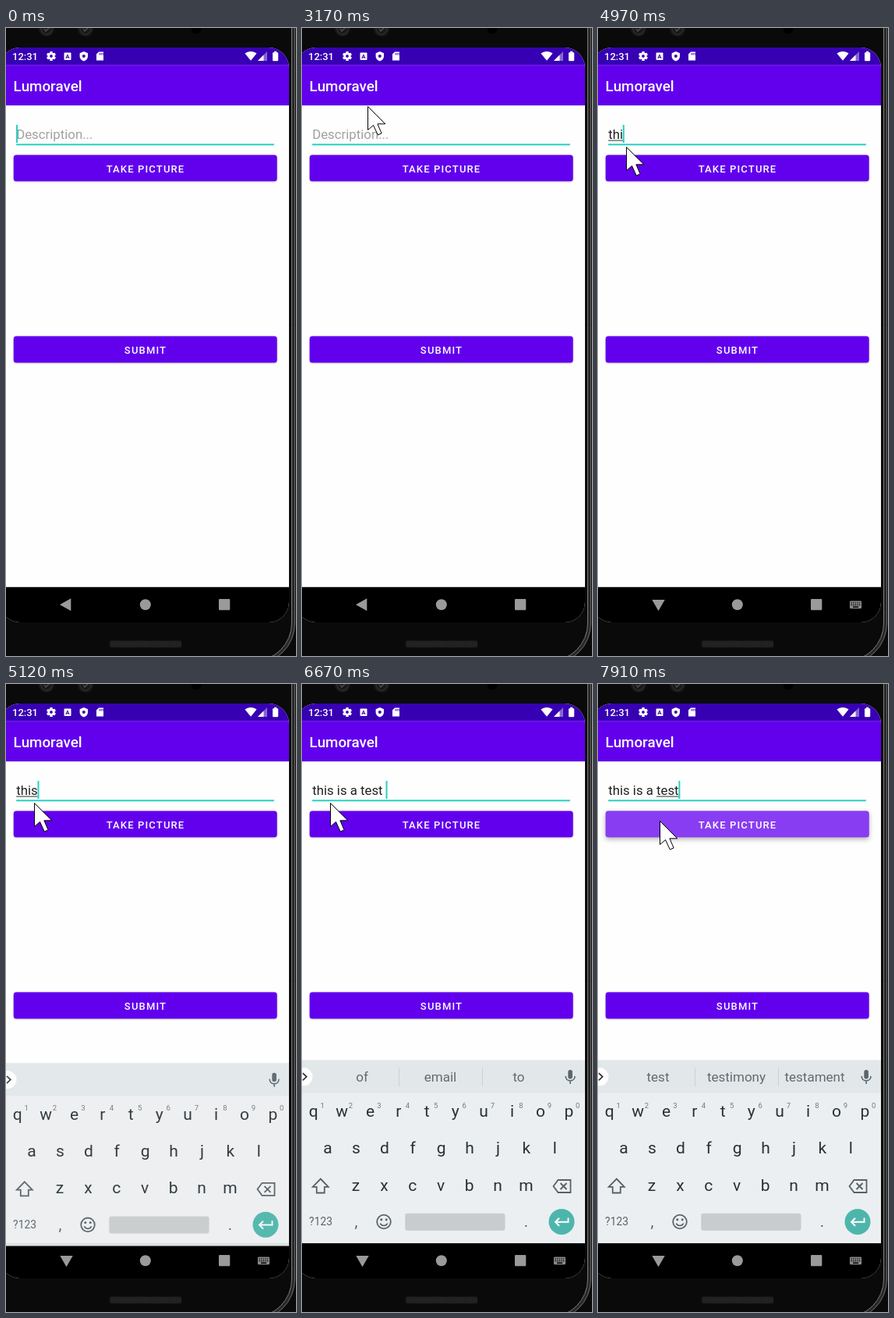
These frames come from a looping animation (372 by 804 pixels, 8 s). An HTML page with a canvas:

```html
<!DOCTYPE html>
<html lang="en">
<head>
<meta charset="utf-8">
<title>Post a picture</title>
<style>
html, body { margin: 0; width: 100%; height: 100%; overflow: hidden; background: #0a0a0a; }
canvas { display: block; width: 372px; height: 804px; }
</style>
</head>
<body>
<canvas id="stage" width="372" height="804"></canvas>
<script>
const ctx = document.getElementById('stage').getContext('2d');
const LOOP = 8000;
const PURPLE = '#6200ee', TEAL = '#2bcfc2';
const TEXT_SIZE = 16.8, TEXT_X = 13.2;

// Pointer tip: time, x, y
const pointerSteps = [
  [140, 285, 767], [220, 268, 640], [300, 240, 480], [380, 212, 330],
  [460, 184, 215], [530, 165, 140], [610, 152, 97], [680, 147, 112],
  [980, 147, 128], [1060, 138, 150], [1150, 131, 159],
  [1380, 127, 153], [1460, 125, 148], [1530, 124, 146],
  [3010, 112, 128], [3090, 96, 110], [3170, 84, 100],
  [3400, 78, 127], [3480, 84, 110], [3630, 87, 109], [3710, 89, 109],
  [3860, 86, 109], [3950, 80, 109], [4100, 76, 127], [4180, 36, 152],
  [7370, 48, 160], [7450, 66, 170], [7530, 79, 175]
];

// Time, typed text, suggestions
const typingSteps = [
  [4880, 't', ''], [4970, 'thi', ''], [5120, 'this', ''],
  [5270, 'this', 'this thistle things'],
  [5660, 'this ', 'is a one'],
  [5810, 'this i', 'I is in'], [5890, 'this is', "is isn't it"], [5970, 'this is ', 'a not the'],
  [6120, 'this is a', 'a and again'], [6350, 'this is a ', 'few good great'],
  [6430, 'this is a t', 'the to that'], [6510, 'this is a te', 'tell team text'],
  [6590, 'this is a test', 'test testimony testament'],
  [6670, 'this is a test ', 'of email to'],
  [6900, 'this is a test', 'test testimony testament']
];

// The caret flips at each of these times, starting visible
const caretFlips = [220, 680, 1150, 1700, 2230, 2710, 3090, 3630, 7450, 7910];

const latest = (steps, t) => steps.filter(s => s[0] <= t).pop();

function box(x, y, w, h, color, r = 0) {
  ctx.fillStyle = color;
  ctx.beginPath();
  ctx.roundRect(x, y, w, h, r);
  ctx.fill();
}

function disc(x, y, r, color) {
  ctx.fillStyle = color;
  ctx.beginPath();
  ctx.arc(x, y, r, 0, Math.PI * 2);
  ctx.fill();
}

function ring(x, y, r, color, width) {
  ctx.strokeStyle = color;
  ctx.lineWidth = width;
  ctx.beginPath();
  ctx.arc(x, y, r, 0, Math.PI * 2);
  ctx.stroke();
}

function shape(path, color, x = 0, y = 0) {
  ctx.save();
  ctx.translate(x, y);
  ctx.fillStyle = color;
  ctx.fill(new Path2D(path));
  ctx.restore();
}

function line(path, color, width, x = 0, y = 0) {
  ctx.save();
  ctx.translate(x, y);
  ctx.strokeStyle = color;
  ctx.lineWidth = width;
  ctx.stroke(new Path2D(path));
  ctx.restore();
}

function text(str, x, y, size, color, { weight = 400, align = 'left', spacing = 0 } = {}) {
  ctx.font = `${weight} ${size}px Roboto, sans-serif`;
  ctx.letterSpacing = spacing + 'px';
  ctx.textAlign = align;
  ctx.fillStyle = color;
  ctx.fillText(str, x, y);
}

function widthOf(str) {
  ctx.font = `400 ${TEXT_SIZE}px Roboto, sans-serif`;
  ctx.letterSpacing = '0px';
  return ctx.measureText(str).width;
}

function outline(inset, color, width) {
  ctx.strokeStyle = color;
  ctx.lineWidth = width;
  ctx.beginPath();
  ctx.roundRect(-60, -80, 432 - inset, 896 - inset, 54 - inset);
  ctx.stroke();
}

function phone() {
  box(0, 0, 372, 804, '#0a0a0a');
  outline(3.5, '#282828', 4);
  outline(5.5, '#7c7c7c', 1);
  outline(1.5, '#6c6c6c', 1);
  for (const x of [52, 102]) {
    disc(x, 1, 10, '#191919');
    ring(x, 1, 7, '#2b2b2b', 1.5);
    line('M-3 0L-1 3L4 -2', '#555', 1.2, x, 1);
  }
  disc(244, 1, 6.5, '#000');
  box(132, 784, 94, 9.5, '#171717', 4);
  for (let x = 135; x < 224; x += 2) box(x, 785, 1, 7.5, '#2d2d2d');
}

function statusBar() {
  box(-10, 25, 373, 22.5, '#3700b3');
  text('12:31', 8, 41, 13, '#fff', { weight: 500 });

  ctx.save();
  ctx.translate(58, 36);
  for (let i = 0; i < 6; i++) {
    ctx.rotate(Math.PI / 3);
    box(-1.7, -6, 3.4, 4, '#fff', 0.6);
  }
  ctx.restore();
  ring(58, 36, 3.2, '#fff', 2.6);

  box(74.5, 31.5, 9, 9.5, '#fff', 1);
  text('A', 79, 39.3, 8, '#3700b3', { weight: 700, align: 'center' });
  shape('M0 -6.2L5.2 -4V0C5.2 3 3 5.4 0 6.3C-3 5.4 -5.2 3 -5.2 0V-4Z', '#fff', 99.8, 36.2);
  disc(99.8, 36, 2, '#3700b3');
  shape('M-1.5 -5.5H4.5V5.5H-4.5V-2.5Z', '#fff', 120.5, 36);
  for (let i = 0; i < 3; i++) box(119.5 + i * 2, 32, 1, 2.4, '#3700b3');

  shape('M0 6L-7.5 -3.2C-3.5 -6.6 3.5 -6.6 7.5 -3.2Z', '#fff', 314, 35.8);
  shape('M12 0V12H0Z', 'rgba(255,255,255,.4)', 323, 30);
  shape('M7.5 4.5V12H0Z', '#fff', 323, 30);
  box(342, 31.2, 7.2, 11, '#fff', 1);
  box(344, 29.8, 3.2, 2, '#fff');
}

function button(y, h, raised) {
  ctx.save();
  ctx.shadowColor = raised ? 'rgba(0,0,0,.3)' : 'rgba(0,0,0,.2)';
  ctx.shadowBlur = raised ? 6 : 2;
  ctx.shadowOffsetY = raised ? 2.5 : 1;
  box(9.7, y, 338, h, PURPLE, 3.5);
  ctx.restore();
}

function label(str, y) {
  text(str, 179, y, 13, '#fff', { weight: 500, align: 'center', spacing: 1.16 });
}

function ripple(p) {
  ctx.save();
  ctx.beginPath();
  ctx.roundRect(9.7, 162.5, 338, 33.7, 3.5);
  ctx.clip();
  disc(79 + 60 * p, 178, 60 + 220 * p, `rgba(255,255,255,${0.12 + 0.12 * p})`);
  ctx.restore();
}

function field(t, typed) {
  box(TEXT_X, 148.3, 330.6, 1.9, TEAL);
  text(typed || 'Description...', TEXT_X, 142, TEXT_SIZE, typed ? '#212121' : '#a0a0a0');
  const word = typed.split(' ').pop();
  const end = TEXT_X + widthOf(typed);
  if (word) {
    const w = widthOf(word);
    box(end - w, 143.6, w, 1, '#333');
  }
  const flips = caretFlips.filter(f => f <= t).length;
  if (flips % 2 === 0) box(end - 0.2, 124, 2, 23, TEAL);
}

function navBar(typing) {
  const grey = '#9a9a9a';
  box(-10, 715.8, 373, 46, '#000');
  disc(178.8, 738.3, 7, grey);
  box(273, 731, 14.3, 14.3, grey, 1);
  if (!typing) {
    shape('M69 738.3L83.3 730.3V746.3Z', grey);
    return;
  }
  shape('M69.3 732H85.7L77.5 746.3Z', grey);
  box(323, 733.5, 15, 9.8, '#8a8a8a', 1);
  for (let i = 0; i < 5; i++) {
    box(324.5 + i * 2.6, 735.2, 1.4, 1.4, '#000');
    box(324.5 + i * 2.6, 737.8, 1.4, 1.4, '#000');
  }
  box(327, 740.6, 7, 1.3, '#000');
}

function suggestionStrip(words) {
  box(-10, 481.5, 373, 42, '#e2e7ea');
  disc(2, 502.8, 11.5, '#fff');
  line('M1 498.2L5.8 502.8L1 507.4', '#333', 1.7);
  if (words) {
    words.split(' ').forEach((w, i) => text(w, 77 + i * 100.5, 509.3, 17, '#616b70', { align: 'center' }));
    for (const x of [124, 231]) box(x, 491, 1, 24, '#cbd1d4');
  }
  box(341.3, 494, 5.6, 11.5, '#5a666c', 2.8);
  line('M338.2 502C338.2 510 350 510 350 502M344.1 508V512', '#5a666c', 1.6);
}

function keyboard(words) {
  const ink = '#263238', grey = '#566268';
  box(-10, 523, 373, 192.8, '#eceff1');
  suggestionStrip(words);

  const rows = [['qwertyuiop', 14.7], ['asdfghjkl', 33], ['zxcvbnm', 69]];
  rows.forEach(([keys, x0], r) => {
    [...keys].forEach((k, i) => {
      const x = x0 + i * 36.4;
      text(k, x, 554.2 + r * 47.2, 21, ink, { align: 'center' });
      if (r === 0) text(String((i + 1) % 10), x + 11.4, 542.5, 9.5, '#6f797e', { align: 'center' });
    });
  });

  line('M0 -9.5L10 0.8H5V8.5H-5V0.8H-10Z', grey, 1.8, 23.8, 643);
  line('M-11 0L-5 -8H11V8H-5ZM-2 -4L6 4M6 -4L-2 4', grey, 1.8, 333.5, 643);

  text('?123', 24, 693.3, 13.8, grey, { align: 'center' });
  text(',', 69.5, 695, 20, grey, { align: 'center' });
  text('.', 287.5, 695, 20, grey, { align: 'center' });
  ring(105, 688.5, 8.8, grey, 1.8);
  disc(101.8, 685.8, 1.5, grey);
  disc(108.2, 685.8, 1.5, grey);
  line('M-4.6 2C-3 6 3 6 4.6 2', grey, 1.7, 105, 688.5);
  box(132.3, 677.8, 128.2, 22, '#c8ccce', 3);
  disc(333, 688.4, 16.5, '#4db6ac');
  line('M8.5 -4.5V0.8H-7.5M-3 -4.2L-8 0.8L-3 5.8', '#fff', 2, 333, 688);
}

function pointer(x, y) {
  const arrow = 'M0 0V30L7 24L12.8 36.4L17.6 34.4L12.4 22.3H22.3Z';
  shape(arrow, '#fff', x + 0.5, y + 0.5);
  line(arrow, '#000', 1, x + 0.5, y + 0.5);
}

function draw(t) {
  const [, typed, words] = latest(typingSteps, t) || [0, '', ''];
  const pressed = t >= 7680;

  phone();
  ctx.save();
  ctx.beginPath();
  ctx.roundRect(-8, 25, 371, 736, 26);
  ctx.clip();
  box(-10, 25, 373, 736, '#fefefe');
  statusBar();
  box(-10, 47.3, 373, 51.7, PURPLE);
  box(-10, 99, 373, 1, '#e6e2ee');
  text('Lumoravel', 9.6, 81, 18.8, '#fff', { weight: 500 });

  field(t, typed);
  button(162.5, 33.7, pressed);
  if (pressed) ripple(Math.min(1, (Math.floor((t - 7680) / 76) + 1) / 4));
  label('TAKE PICTURE', 184.6);
  button(394.5, 34, false);
  label('SUBMIT', 416.7);

  navBar(t >= 4880);
  if (t >= 5120) {
    const sliding = t < 5200;
    ctx.save();
    if (sliding) {
      ctx.globalAlpha = 0.94;
      ctx.translate(0, 3.8);
    }
    keyboard(words);
    ctx.restore();
  }
  ctx.restore();

  const tip = latest(pointerSteps, t);
  if (tip) pointer(tip[1], tip[2]);
}

const start = performance.now();
function tick() {
  draw((performance.now() - start) % LOOP);
  requestAnimationFrame(tick);
}
tick();
</script>
</body>
</html>
```
